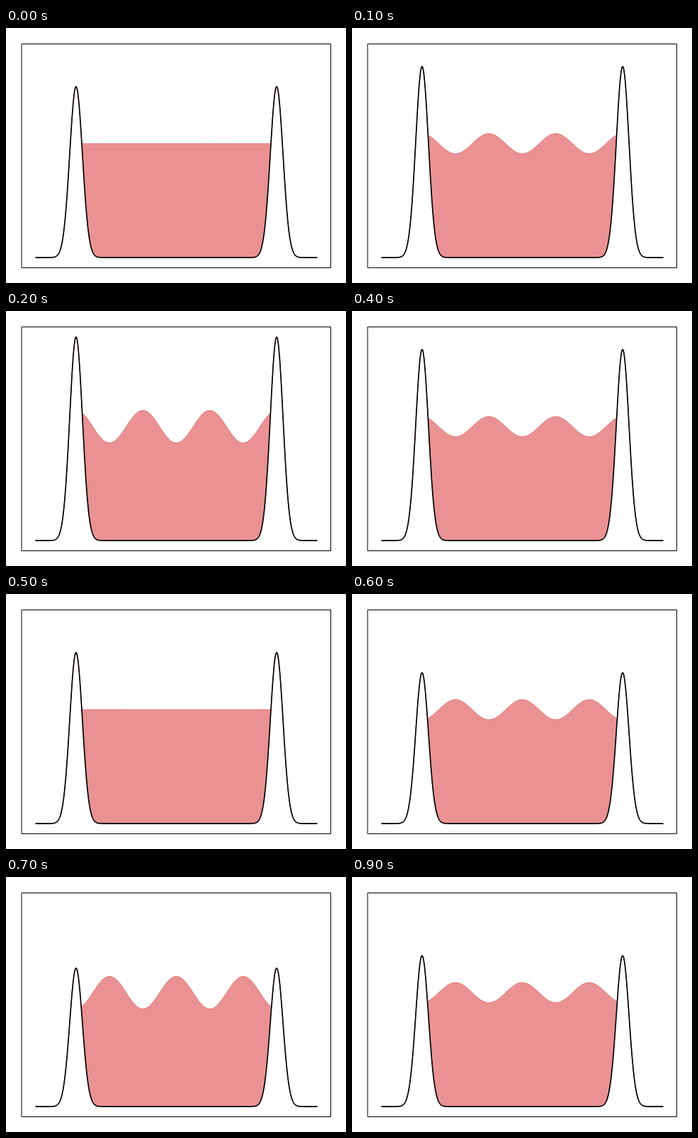
Animation, 480 px wide and 360 px high, one loop 1 s. Source, as an HTML page with a canvas:

```html
<!DOCTYPE html>
<html lang="en">
<head>
<meta charset="utf-8">
<title>Oscillating well</title>
<style>
  html, body { margin: 0; width: 100%; height: 100%; overflow: hidden; background: #fff; }
  canvas { display: block; }
</style>
</head>
<body>
<canvas id="stage" width="480" height="360"></canvas>
<script>
const ctx = document.getElementById('stage').getContext('2d');
const FRAMES = 10, FRAME_MS = 100;
const X_MIN = -0.2, X_MAX = 1.2, SAMPLES = 1400;
const xs = Array.from({ length: SAMPLES + 1 }, (_, i) => X_MIN + (X_MAX - X_MIN) * i / SAMPLES);

// Data units to pixels
const px = x => 98.9 + 283.2 * x;
const py = y => 324.1 - 160.9 * y;

const bump = d => Math.exp(-d * d / 0.002);
const barrier = (x, s) => (1.5 + 0.3 * s) * (bump(x) + bump(x - 1));
const liquid = (x, s) => 1 + 0.15 * s * Math.cos(6 * Math.PI * x);

function surface(x, s) {
  const wall = barrier(x, s);
  return x > 0 && x < 1 ? Math.max(wall, liquid(x, s)) : wall;
}

function trace(points, f, s) {
  for (const x of points) ctx.lineTo(px(x), py(f(x, s)));
}

function draw(s) {
  ctx.fillStyle = '#fff';
  ctx.fillRect(0, 0, 480, 360);
  ctx.lineJoin = 'round';

  // Liquid between the walls, with a translucent outline
  ctx.fillStyle = ctx.strokeStyle = 'rgba(214, 39, 40, 0.5)';
  ctx.lineWidth = 1;
  ctx.beginPath();
  trace(xs, surface, s);
  trace([...xs].reverse(), barrier, s);
  ctx.closePath();
  ctx.fill();
  ctx.stroke();

  // Barrier curve
  ctx.strokeStyle = '#000';
  ctx.lineWidth = 1.65;
  ctx.lineCap = 'square';
  ctx.beginPath();
  trace(xs, barrier, s);
  ctx.stroke();

  // Axes frame
  ctx.lineWidth = 1;
  ctx.strokeRect(22.5, 22.5, 436, 316);
}

function tick() {
  const step = Math.floor(performance.now() / FRAME_MS) % FRAMES;
  draw(Math.sin(2 * Math.PI * step / FRAMES));
  requestAnimationFrame(tick);
}
tick();
</script>
</body>
</html>
```
